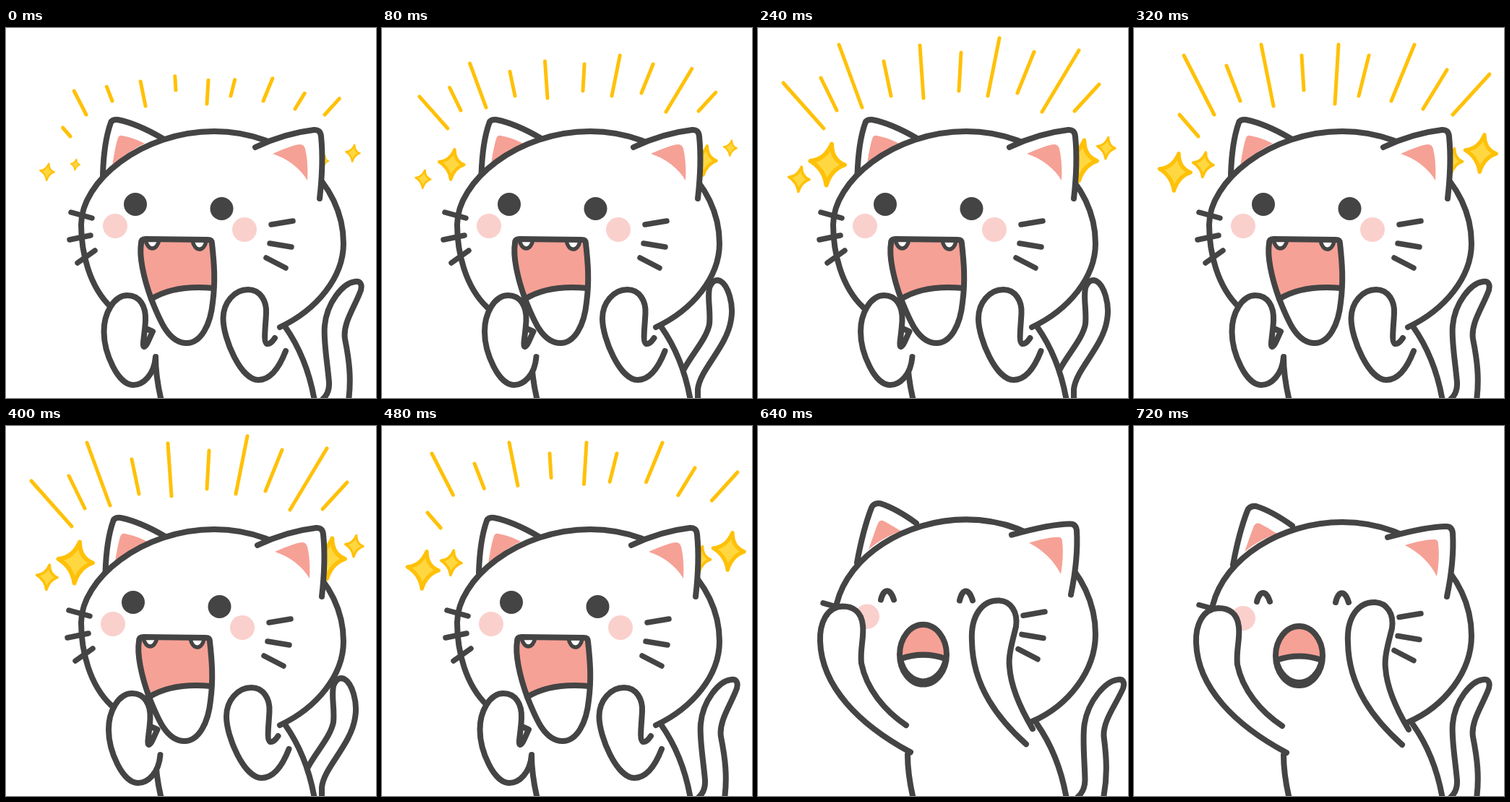
An HTML page with a canvas for the animation above (0.8 s loop, 512x512 px).

```html
<!DOCTYPE html>
<html lang="en">
<head>
<meta charset="utf-8">
<title>Excited cat</title>
<style>
  html, body { margin: 0; overflow: hidden; background: #fff; }
  canvas { display: block; }
</style>
</head>
<body>
<canvas id="stage" width="512" height="512"></canvas>
<script>
const ctx = document.getElementById('stage').getContext('2d');
const INK = '#444', PINK = '#f6a196', BLUSH = '#fad0cc', GOLD = '#ffc107', LEMON = '#ffd740';
const STEP = 80, LOOP = 800;

function shape(d, fill, stroke = INK, width = 8) {
  const path = new Path2D(d);
  if (fill) { ctx.fillStyle = fill; ctx.fill(path); }
  if (stroke) { ctx.strokeStyle = stroke; ctx.lineWidth = width; ctx.stroke(path); }
}

function dot(x, y, r, color) {
  ctx.fillStyle = color;
  ctx.beginPath();
  ctx.arc(x, y, r, 0, 7);
  ctx.fill();
}

function shifted(dx, dy, draw) {
  ctx.save();
  ctx.translate(dx, dy);
  draw();
  ctx.restore();
}

// Each ray: inner x, y, outer x, y
const RAYS = [
  [[111,120,69,38], [89,150,63,120], [147,101,128,52], [193,108,176,23], [235,86,232,38],
   [278,105,283,23], [311,94,325,38], [356,101,388,23], [400,112,433,58], [441,120,492,64]],
  [[91,139,35,76], [109,114,87,69], [144,110,112,23], [184,94,174,46], [229,97,224,24],
   [278,87,281,34], [318,94,334,14], [359,90,382,33], [393,116,444,31], [438,115,472,78]]
];
// Each star: x, y, scale
const STARS = [
  [[57,199,.9], [96,189,.6], [480,173,.9], [440,184,.62]],
  [[96.5,188.5,1], [57,209,.6], [446,183,.98], [482,166,.52]]
];
const STAR = 'M5.5-28Q5.5-6 23.5 1Q5 7-2 29Q-5 7-24-4.5Q-4-6 5.5-28Z';

function sparkle(set, from, to, size) {
  for (const [x, y, X, Y] of RAYS[set]) {
    const at = k => `${x + (X - x) * k} ${y + (Y - y) * k}`;
    shape(`M${at(from)}L${at(to)}`, null, GOLD, 5);
  }
  for (const [x, y, s] of STARS[set]) {
    shifted(x, y, () => {
      ctx.scale(s * size, s * size);
      shape(STAR, LEMON, GOLD, 6);
    });
  }
}

const TAIL_UP = 'M438 514Q448 505 447 490C445 465 439 432 441 412C444 380 466 353 483 351C492 349 494 358 489 368C480 390 466 410 469 430C475 460 478 485 474 516';
const TAIL_DOWN = 'M418 472C430 450 449 430 453 410C455 390 450 375 453 360Q458 346 468 350C479 356 487 382 483 404C477 442 440 472 437 500V516';

function body() {
  shape('M207 455C207 475 210 495 215 516H427C420 475 405 440 386 413', '#fff', null);
  shape('M207 455C207 475 210 495 215 516M386 413C405 440 420 475 427 516');
}

function whiskers() {
  shape('M90 255L119 263M88 293L117 287M99 325L123 308M367 272L397 267M365 298L395 303M360 318L387 332', null, INK, 7.5);
}

function shoutingFace() {
  dot(179, 244, 16, INK);
  dot(298.5, 250, 16, INK);
  dot(151, 274, 17, BLUSH);
  dot(330, 279, 17, BLUSH);
  whiskers();
  const mouth = 'M193 292L279 293Q285 293 285 298C288 325 290 350 286 380C283 410 270 436 250 436C225 436 213 405 201 375C190 345 184 315 187 298Q187 292 193 292Z';
  shape(mouth, PINK, null);
  shape('M201 375C225 360 255 357 287 360L286 380C283 410 270 436 250 436C225 436 213 405 201 375Z', '#fff', null);
  shape('M193 293C196 309 209 309 212 293M258 294C261 310 274 310 277 295', '#fff', INK, 5.5);
  shape('M201 375C225 360 255 357 287 360');
  shape(mouth);
}

function shouting(sway) {
  shape(sway ? TAIL_DOWN : TAIL_UP, '#fff');
  body();
  shifted(sway * 3.5, 0, () => {
    shape('M134 203C135 170 140 145 145 131Q147 126 155 127C175 131 200 143 217 153', '#fff');
    shape('M147 191C149 178 152 160 155 152Q157 148 161 149C172 151 185 156 192 160C175 168 160 178 147 191Z', PINK, null);
  });
  shape('M146 387C115 358 104 310 104 272C104 212 188 143 288 143C390 143 467 215 467 298C467 345 430 390 379 414', '#fff');
  shifted(sway * 3, 0, () => {
    shape('M345 165C370 153 400 144 426 141Q435 140 436 150C439 180 437 210 434 236', '#fff');
    shape('M369 174C383 168 397 162 407 161Q412 161 414 167C417 180 418 195 417 211C407 194 390 181 369 174Z', PINK, null);
  });
  shifted(sway * -3, 0, shoutingFace);
  shifted(sway * 6.5, 0, () => shape('M207 455C205 480 190 494 176 494C155 494 135.5 450 135.5 420C135.5 395 149 370 168 370C185 370 194 385 193 405C192 425 188 440 191 441C195 440 198 430 203 420L194 416', '#fff'));
  shifted(sway * 4.5, 0, () => shape('M387 447C375 478 362 487 349 487C325 487 300.5 430 300.5 402C300.5 380 316 362 335 362C352 362 361 378 360 395C359 415 356 435 361 437Q366 438 372 429', '#fff'));
}

function laughing(stretch) {
  ctx.save();
  if (stretch) ctx.transform(1, 0, -.068, 1, 4 + .068 * 512, 0);
  shape(TAIL_UP, '#fff');
  ctx.restore();

  ctx.save();
  if (stretch) ctx.transform(1, 0, 0, 1.0095, 0, -.0095 * 512);
  body();
  shape('M137 192C142 165 150 135 157 117Q160 110 169 111C185 116 205 128 219 138', '#fff');
  shape('M153 174C158 160 162 148 166 138Q169 133 174 135C184 140 193 146 198 149C183 154 167 162 153 174Z', PINK, null);
  shape('M109 248C125 183 204 133 288 133C390 133 467 205 467 290C467 340 430 388 379 410', '#fff');
  shape('M351 154C380 146 410 139 432 139Q440 139 441 148C443 180 438 212 433 236', '#fff');
  shape('M375 165C390 160 405 157 416 157Q421 157 421 163C423 180 421 197 419 208C410 190 395 175 375 165Z', PINK, null);
  shape('M170 243C174 227 183 227 188 243M279 244C283 227 292 227 297 244');
  dot(151, 266, 17, BLUSH);
  shifted(0, -7.5, whiskers);
  const mouth = 'M196 318a32.5 41 0 0 1 65 0a32.5 41 0 0 1-65 0Z';
  shape(mouth, PINK, null);
  shape('M197 324Q229 313 260 324A32.5 41 0 0 1 197 324Z', '#fff');
  shape(mouth);
  shape('M205 415C175 395 150 365 143 330C141 310 147 295 145 278C143 258 130 252 117 252C95 253 85 275 86 300C88 362 140 414 211 452', '#fff');
  shape('M371 441C333 407 297 362 296 300C294 265 310 243 334 244C350 245 360 260 357 280C352 300 346 320 348 335C350 365 365 395 380 420', '#fff');
  ctx.restore();
}

function render(time) {
  const step = Math.floor(time % LOOP / STEP);
  ctx.fillStyle = '#fff';
  ctx.fillRect(0, 0, 512, 512);
  ctx.lineCap = ctx.lineJoin = 'round';
  if (step < 8) {
    const sway = step % 2;
    const grown = Math.min(1, .4 + .3 * step);
    const faded = Math.max(0, .3 * (step - 5));
    sparkle(sway, faded, grown, Math.min(1, .45 + .275 * step));
    shouting(sway);
  } else {
    laughing(step === 8);
  }
}

const start = performance.now();
function tick() {
  render(performance.now() - start);
  requestAnimationFrame(tick);
}
tick();
</script>
</body>
</html>
```
